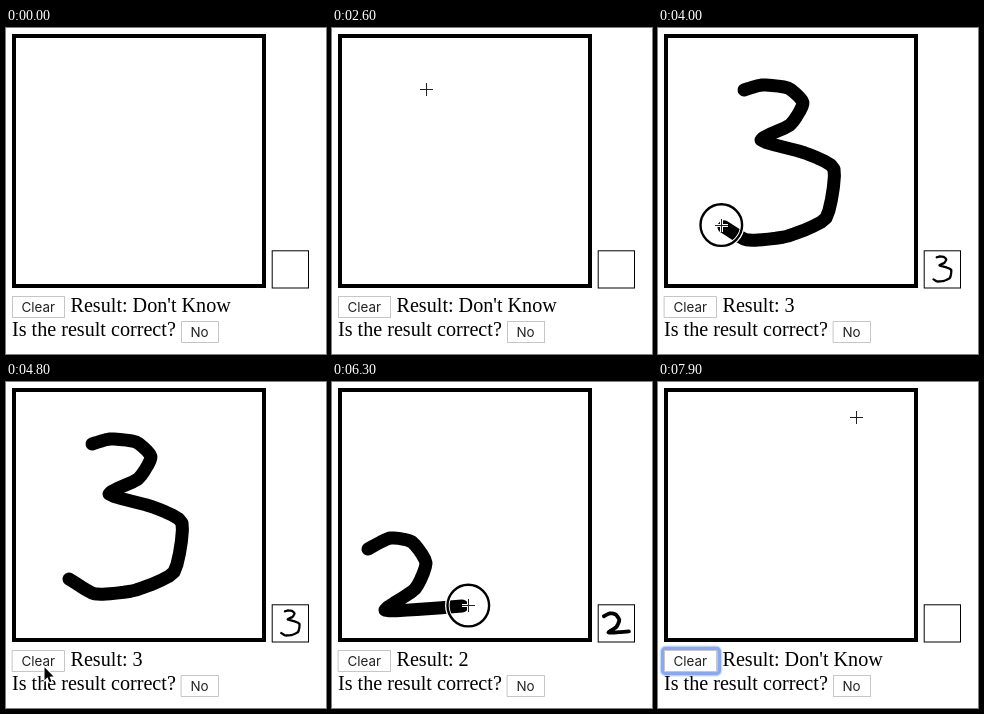
An HTML page with a canvas for the animation above (8000 ms loop, 320x326 px).

```html
<!DOCTYPE html>
<html lang="en">
<head>
<meta charset="utf-8">
<title>Digit recognition</title>
<style>
html, body { margin: 0; width: 100%; height: 100%; overflow: hidden; background: #fff; }
canvas { display: block; width: 320px; height: 326px; }
</style>
</head>
<body>
<canvas id="stage"></canvas>
<script>
const canvas = document.getElementById('stage');
const ctx = canvas.getContext('2d');
const ratio = window.devicePixelRatio || 1;
canvas.width = 320 * ratio;
canvas.height = 326 * ratio;

const LOOP = 8000, TICK = 100, PEN = 13;
const SERIF = '20.15px "Liberation Serif", Times, serif';
const SANS = '13.4px Inter, Arial, sans-serif';

const clearButton = [36, 279];

// The pointer follows one smooth curve per leg and rests between legs
const leg = (start, end, ...points) => ({ start, end, points });

const three = leg(2800, 4000, [86, 62], [104, 57], [130, 60], [145, 75], [132, 97], [103, 112],
  [147, 125], [176, 141], [168, 190], [130, 208], [100, 212], [86, 211], [63, 197]);
const two = leg(5600, 6400, [36, 167], [58, 156], [80, 160], [94, 181], [83, 207], [53, 228],
  [92, 227], [136, 223.5], [145, 223]);
const strokes = [
  { ...three, clear: 5000, guesses: '1723' },
  { ...two, clear: 7400, guesses: '172' }
];
const legs = [
  leg(500, 1000, [180, 2], [93, 85], [135, 140]),
  leg(1200, 1500, [135, 140], [138, 113]),
  leg(1800, 2600, [138, 113], [186, 186], [94, 61]),
  leg(2600, 2800, [94, 61], [86, 62]),
  three,
  leg(4000, 4900, [63, 197], [50, 302], clearButton),
  leg(5000, 5400, clearButton, [30, 168]),
  leg(5400, 5600, [30, 168], [36, 167]),
  two,
  leg(6400, 7300, [145, 223], [70, 274], clearButton),
  leg(7400, 7900, clearButton, [198, 35])
];
const presses = [...strokes, ...strokes.map(s => leg(s.clear - TICK, s.clear - 1))];

const progress = (l, t) => Math.max(0, Math.min(1, (t - l.start) / (l.end - l.start)));

// Cardinal spline through evenly timed points
function along(l, t) {
  const p = l.points, last = p.length - 1;
  const n = progress(l, t) * last;
  const i = Math.min(last - 1, Math.floor(n)), k = n - i;
  const at = j => p[Math.max(0, Math.min(last, j))];
  return [0, 1].map(c => {
    const a = at(i)[c], b = at(i + 1)[c];
    const ma = (b - at(i - 1)[c]) * 0.3, mb = (at(i + 2)[c] - a) * 0.3;
    const ease = k * k * (3 - 2 * k);
    // Open legs run at even speed
    if (last === 1) return a + (b - a) * k;
    return a + (b - a) * ease + ma * k * (1 - k) ** 2 - mb * k * k * (1 - k);
  });
}

function inkAt(s, t) {
  const now = Math.min(s.end, t - 20), points = [];
  for (let u = s.start; u < now; u += 20) points.push(along(s, u));
  points.push(along(s, now));
  return points;
}

function polyline(points, width) {
  ctx.beginPath();
  points.forEach(([x, y]) => ctx.lineTo(x, y));
  ctx.lineWidth = width;
  ctx.lineCap = ctx.lineJoin = 'round';
  ctx.strokeStyle = '#000';
  ctx.stroke();
}

// Ink scaled to fit and centred in the small preview box
function preview(points) {
  const xs = points.map(p => p[0]), ys = points.map(p => p[1]);
  const x0 = Math.min(...xs), x1 = Math.max(...xs);
  const y0 = Math.min(...ys), y1 = Math.max(...ys);
  const k = 25 / Math.max(40, x1 - x0, y1 - y0);
  polyline(points.map(([x, y]) => [
    284.4 + (x - (x0 + x1) / 2) * k,
    241 + (y - (y0 + y1) / 2) * k
  ]), PEN * k * 1.1);
}

function text(str, x, y, font, color) {
  ctx.font = font;
  ctx.fillStyle = color;
  ctx.fillText(str, x, y);
}

function button(label, x, y, w, h, baseline) {
  ctx.fillStyle = '#fff';
  ctx.fillRect(x, y, w, h);
  ctx.lineWidth = 1;
  ctx.strokeStyle = '#c6c6c6';
  ctx.strokeRect(x + 0.5, y + 0.5, w - 1, h - 1);
  text(label, x + 9.5, baseline, SANS, '#222');
}

function focusRing() {
  for (const [width, color] of [[6, '#d0dcfb'], [3.5, '#88a8f3']]) {
    ctx.beginPath();
    ctx.roundRect(4.7, 266.5, 56.6, 25, 3);
    ctx.lineWidth = width;
    ctx.strokeStyle = color;
    ctx.stroke();
  }
}

function ring(x, y, r, width, color) {
  ctx.beginPath();
  ctx.arc(x, y, r, 0, Math.PI * 2);
  ctx.lineWidth = width;
  ctx.strokeStyle = color;
  ctx.stroke();
}

function crosshair(x, y) {
  x = Math.floor(x) + 0.5;
  y = Math.floor(y) + 0.5;
  ctx.lineCap = 'butt';
  for (const [width, color] of [[3, '#fff'], [1, '#222']]) {
    ctx.beginPath();
    ctx.moveTo(x - 6.5, y);
    ctx.lineTo(x + 6.5, y);
    ctx.moveTo(x, y - 6.5);
    ctx.lineTo(x, y + 6.5);
    ctx.lineWidth = width;
    ctx.strokeStyle = color;
    ctx.stroke();
  }
}

function arrow(x, y) {
  ctx.beginPath();
  [[0, 0], [0, 13], [3, 10], [5, 15], [7, 14.3], [5, 9.4], [9, 9.1]]
    .forEach(([dx, dy]) => ctx.lineTo(x + 0.5 + dx, y + 1.5 + dy));
  ctx.closePath();
  ctx.lineWidth = 2;
  ctx.lineJoin = 'miter';
  ctx.strokeStyle = '#fff';
  ctx.stroke();
  ctx.fillStyle = '#000';
  ctx.fill();
}

function pointer(t) {
  const now = legs.filter(l => t >= l.start).pop();
  if (!now) return;
  const [x, y] = along(now, t);
  const press = presses.find(p => t >= p.start && t <= p.end);
  if (press) {
    const grow = Math.min(1, (t - press.start + 50) / 150);
    ring(x + 0.3, y + 0.1, 21 * grow, 4.6, '#fff');
    ring(x + 0.3, y + 0.1, 20.8 * grow, 2.4, '#000');
  }
  const onPad = x > 8 && x < 258 && y > 8 && y < 258;
  if (onPad && t >= 1300) crosshair(x, y);
  else arrow(x, y);
}

function draw(t) {
  ctx.setTransform(ratio, 0, 0, ratio, 0, 0);
  ctx.fillStyle = '#fff';
  ctx.fillRect(0, 0, 320, 326);

  ctx.strokeStyle = '#000';
  ctx.lineJoin = 'miter';
  ctx.lineWidth = 4;
  ctx.strokeRect(8, 8, 250, 250);
  ctx.lineWidth = 1;
  ctx.strokeRect(266.2, 222.8, 36.3, 37.2);

  let result = "Don't Know";
  const s = strokes.find(s => t >= s.start && t < s.clear);
  if (s) {
    const ink = inkAt(s, t);
    polyline(ink, PEN);
    preview(ink);
    const count = s.guesses.length;
    result = s.guesses[Math.min(count - 1, Math.floor(progress(s, t) * count))];
  }

  const focused = strokes.some((s, i) => {
    const next = strokes[i + 1];
    return t >= s.clear - TICK && t < (next ? next.start : LOOP);
  });
  if (focused) focusRing();
  button('Clear', 6, 268, 53, 22, 284);
  text('Result: ' + result, 64.5, 284, SERIF, '#000');
  text('Is the result correct?', 6, 308, SERIF, '#000');
  button('No', 175, 293, 38, 22, 308.5);
  pointer(t);
}

const begin = performance.now();
function frame() {
  const t = (performance.now() - begin) % LOOP;
  draw(Math.floor(t / TICK) * TICK);
  requestAnimationFrame(frame);
}
frame();
</script>
</body>
</html>
```
